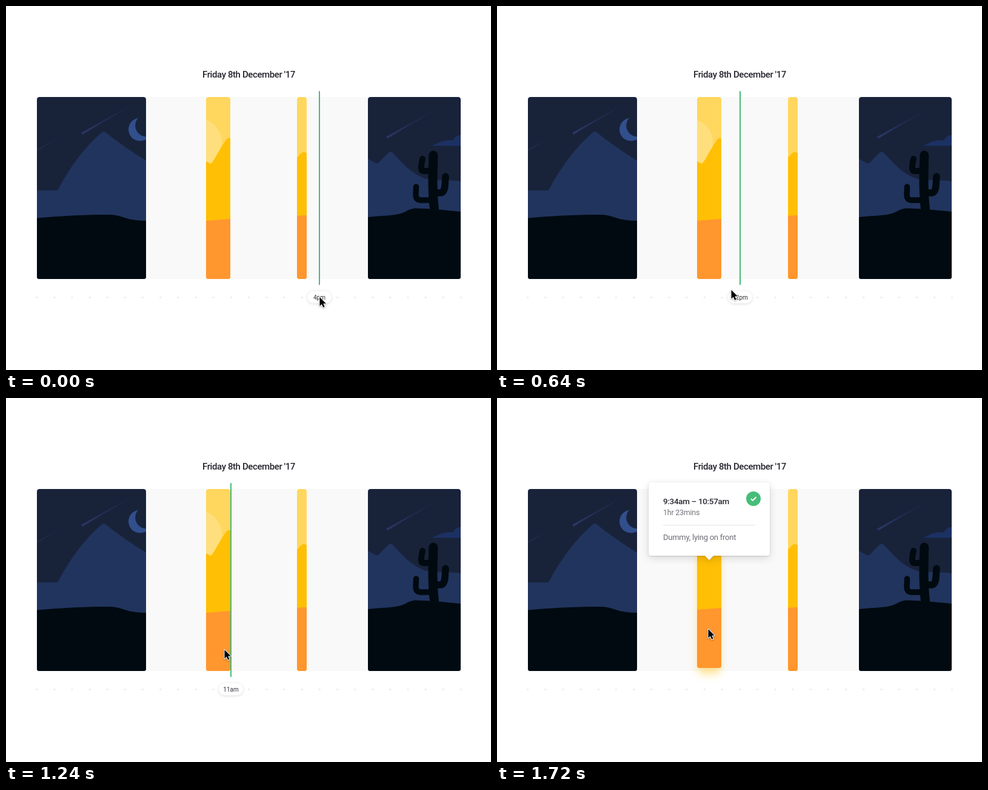
An HTML page with a canvas for the animation above (2.72 s loop, 800 by 600 pixels).

```html
<!DOCTYPE html>
<html lang="en">
<head>
<meta charset="utf-8">
<title>Day timeline</title>
<style>
html, body { margin: 0; width: 100%; height: 100%; overflow: hidden; background: #fff; }
canvas { display: block; }
</style>
</head>
<body>
<canvas id="stage" width="800" height="600"></canvas>
<script>
const ctx = document.getElementById('stage').getContext('2d');
const LOOP = 2720, STEP = 20, FADE = 230, HOVER = 1260;
const FONT = 'Roboto, Inter, sans-serif';
const NIGHT = { sky: '#18233a', hill: '#21345e', ground: '#000a10', moon: '#324f8d', cloud: '#1c3163' };
const DAY = { sky: '#ffd75e', sun: '#ffdf7d', hill: '#ffbf05', ground: '#ff962e' };
const GREEN = '#46bd78';

// Pointer path: time, x, y
const POINTER = [
  [0, 517, 480], [100, 513, 480], [140, 503, 478], [176, 473, 475], [200, 450, 472],
  [290, 415, 469], [460, 391, 468], [640, 386, 468], [860, 380, 467], [1010, 377, 463],
  [1240, 360, 415], [1340, 350, 392], [1480, 348, 382], [1720, 348, 381]
];
// Hour labels: hour, time shown, time hidden
const LABELS = [
  [16, -1000, 140], [15, 140, 176], [14, 176, 210],
  [13, 210, 290], [12, 385, 640], [11, 640, HOVER]
];

const clamp = v => Math.max(0, Math.min(1, v));
const hourX = h => 50.6 + h * 29.165;

// cubic-bezier(.25, .1, .25, 1)
function ease(x) {
  x = clamp(x);
  let lo = 0, hi = 1, s = x;
  for (let i = 0; i < 18; i++) {
    const r = 1 - s;
    if (0.75 * r * r * s + 0.75 * r * s * s + s * s * s < x) lo = s; else hi = s;
    s = (lo + hi) / 2;
  }
  return 0.3 * (1 - s) * (1 - s) * s + 3 * (1 - s) * s * s + s * s * s;
}

// Monotone cubic interpolation along the pointer path
function along(t, k) {
  const P = POINTER, n = P.length - 1;
  if (t >= P[n][0]) return P[n][k];
  const i = P.findIndex((p, j) => j < n && t < P[j + 1][0]);
  const rate = j => (P[j + 1][k] - P[j][k]) / (P[j + 1][0] - P[j][0]);
  const slope = j => {
    if (j === 0 || j === n) return 0;
    const a = rate(j - 1), b = rate(j);
    return a * b > 0 ? 2 * a * b / (a + b) : 0;
  };
  const d = P[i + 1][0] - P[i][0], u = (t - P[i][0]) / d, v = 1 - u;
  return P[i][k] * (1 + 2 * u) * v * v + P[i + 1][k] * u * u * (3 - 2 * u)
    + d * u * v * (slope(i) * v - slope(i + 1) * u);
}

function fill(path, color) {
  ctx.fillStyle = color;
  ctx.fill(typeof path === 'string' ? new Path2D(path) : path);
}

function box(x, y, w, h, r) {
  const p = new Path2D();
  p.roundRect(x, y, w, h, r);
  return p;
}

function disc(x, y, r, color) {
  const p = new Path2D();
  p.arc(x, y, r, 0, 7);
  fill(p, color);
}

function shadow(color, blur, dy) {
  ctx.shadowColor = color;
  ctx.shadowBlur = blur;
  ctx.shadowOffsetY = dy;
}

function stroke(path, width, color) {
  ctx.lineWidth = width;
  ctx.strokeStyle = color;
  ctx.stroke(new Path2D(path));
}

function text(str, x, y, font, color, spacing = 0, align = 'left') {
  ctx.font = font + ' ' + FONT;
  ctx.letterSpacing = spacing + 'px';
  ctx.textAlign = align;
  ctx.fillStyle = color;
  ctx.fillText(str, x, y);
}

function card(x, w, sky, paint) {
  const p = box(x, 150, w, 300, 4);
  ctx.save();
  ctx.clip(p);
  fill(p, sky);
  paint();
  ctx.restore();
}

function trail(x, y) {
  const g = ctx.createLinearGradient(x, y, x + 86, y - 49);
  g.addColorStop(0, '#2a3866');
  g.addColorStop(1, 'rgba(36,50,92,.25)');
  fill(`M${x - 1} ${y - 1} L${x + 86} ${y - 49} L${x + 1} ${y + 2} Z`, g);
}

function nightLeft() {
  trail(125, 210);
  trail(8, 262);
  disc(221, 203.5, 19, NIGHT.moon);
  disc(231.5, 197, 18.3, NIGHT.sky);
  fill('M51 304 H85 C104 268 128 234 158 208.5 Q161 206 164.5 208.5 C185 225 207 240 231 255 V450 H51 Z', NIGHT.hill);
  fill('M51 349.5 C90 346 135 343.5 172 344 C195 345 195 353.5 231 354 V450 H51 Z', NIGHT.ground);
}

function cactus() {
  ctx.lineCap = ctx.lineJoin = 'round';
  stroke('M704.8 246 C704.5 275 702 300 706.5 334', 15, NIGHT.ground);
  stroke('M687 252 C685 260 683 272 688 272 H700', 10, NIGHT.ground);
  stroke('M676.5 298 C676 312 674 319 683 320 H702', 9.5, NIGHT.ground);
  stroke('M725 281 C724 294 725 307 717 308 H708', 11.5, NIGHT.ground);
}

function nightRight() {
  trail(628, 216.5);
  fill('M703 230.5 C711 226 717 223 725 222 Q731 221 737 221.5 C741 215 745 213 750 212.5 V230.5 Z', NIGHT.cloud);
  fill('M597 252 L611 259.5 Q614 260 616 257 L630 242.5 Q634.5 238.5 639 243 C655 260 667 275 690 284 C706 288.5 730 286 750 289 V450 H597 Z', NIGHT.hill);
  cactus();
  fill('M597 348 C625 345 645 346 659 339 Q668 333 678 333.5 C702 334 725 336.5 750 339 V450 H597 Z', NIGHT.ground);
}

function dayWide() {
  disc(317, 224.5, 39, DAY.sun);
  fill('M330 256 L336 259.5 Q339 261 341 257 C348 245 355 232 363 220.5 Q366 216.5 370 218.5 V450 H330 Z', DAY.hill);
  fill('M330 354 L370 351 V450 H330 Z', DAY.ground);
}

function dayNarrow() {
  fill('M480 250 L487 242.5 Q491 239 496 243 V450 H480 Z', DAY.hill);
  fill('M480 346 L496 344.8 V450 H480 Z', DAY.ground);
}

function hourLabel([h, on, off], t) {
  const a = ease((t - on) / FADE) - ease((t - off) / FADE);
  if (a < 0.01) return;
  const x = Math.round(hourX(h)), dy = 20 * (1 - a);
  ctx.save();
  ctx.globalAlpha = a;
  ctx.translate(x, dy);
  shadow('rgba(0,0,0,.14)', 5, 1);
  fill(box(-20, 470, 40, 20, 10), '#fff');
  shadow('transparent', 0, 0);
  text((h > 12 ? h - 12 : h) + (h < 12 ? 'am' : 'pm'), 0, 483.5, '10px', '#33333b', 0, 'center');
  ctx.restore();
}

function tooltip(a) {
  if (a <= 0) return;
  ctx.save();
  ctx.globalAlpha = a;
  ctx.translate(0, -20 * (1 - a));
  const p = box(250, 139, 200, 121, 4);
  p.addPath(new Path2D('M343 260 L350 267 L357 260 Z'));
  shadow('rgba(0,0,0,.13)', 14, 4);
  fill(p, '#fff');
  shadow('rgba(0,0,0,.22)', 2, 0.5);
  fill(p, '#fff');
  shadow('transparent', 0, 0);
  text('9:34am – 10:57am', 274, 175, '500 13.5px', '#2b2a33', -0.35);
  text('1hr 23mins', 274, 193, '12.5px', '#74737c', -0.25);
  fill(box(274, 209, 152, 1, 0), '#e4e4e6');
  text('Dummy, lying on front', 274, 234, '13px', '#6c6b76', -0.25);
  disc(423, 166, 12, GREEN);
  ctx.lineCap = ctx.lineJoin = 'miter';
  stroke('M419 166.3 L421.8 169 L427.5 163.3', 2, '#fff');
  ctx.restore();
}

function pointer(x, y) {
  ctx.save();
  ctx.translate(x, y);
  const p = new Path2D('M0.5 0 V14.5 L3.8 11.4 L6.2 16.8 L8.6 15.8 L6.3 10.6 H10.8 Z');
  ctx.lineJoin = 'round';
  ctx.lineWidth = 2;
  ctx.strokeStyle = '#fff';
  shadow('rgba(0,0,0,.35)', 3, 1);
  ctx.stroke(p);
  shadow('transparent', 0, 0);
  fill(p, '#000');
  ctx.restore();
}

function draw(t) {
  const px = along(t, 1), py = along(t, 2);
  const hover = ease((t - HOVER) / FADE);

  fill(box(0, 0, 800, 600, 0), '#fff');
  text("Friday 8th December '17", 400.5, 118, '500 15px', '#25242d', -0.4, 'center');
  fill(box(51, 150, 699, 300, 4), '#f9f9f9');
  for (let h = 0; h <= 24; h++) disc(hourX(h), 480.5, 1.8, '#f0f0f1');

  card(51, 180, NIGHT.sky, nightLeft);
  card(597, 153, NIGHT.sky, nightRight);
  card(480, 16, DAY.sky, dayNarrow);

  ctx.save();
  ctx.translate(0, -5 * hover);
  if (hover > 0) {
    shadow(`rgba(255,191,5,${0.42 * hover})`, 14, 11);
    fill(box(332, 200, 36, 249, 4), DAY.ground);
    shadow('transparent', 0, 0);
  }
  card(330, 40, DAY.sky, dayWide);
  ctx.restore();

  if (t < HOVER) {
    const x = Math.round(hourX(Math.round((px - 50.6) / 29.165)));
    fill(box(x - 1, 140, 2, 320, 1), '#48b87a');
  }
  LABELS.forEach(l => hourLabel(l, t));
  tooltip(hover);
  pointer(px, py);
}

const start = performance.now();
function tick() {
  const t = (performance.now() - start) % LOOP;
  draw(Math.floor(t / STEP) * STEP);
  requestAnimationFrame(tick);
}
tick();
</script>
</body>
</html>
```
